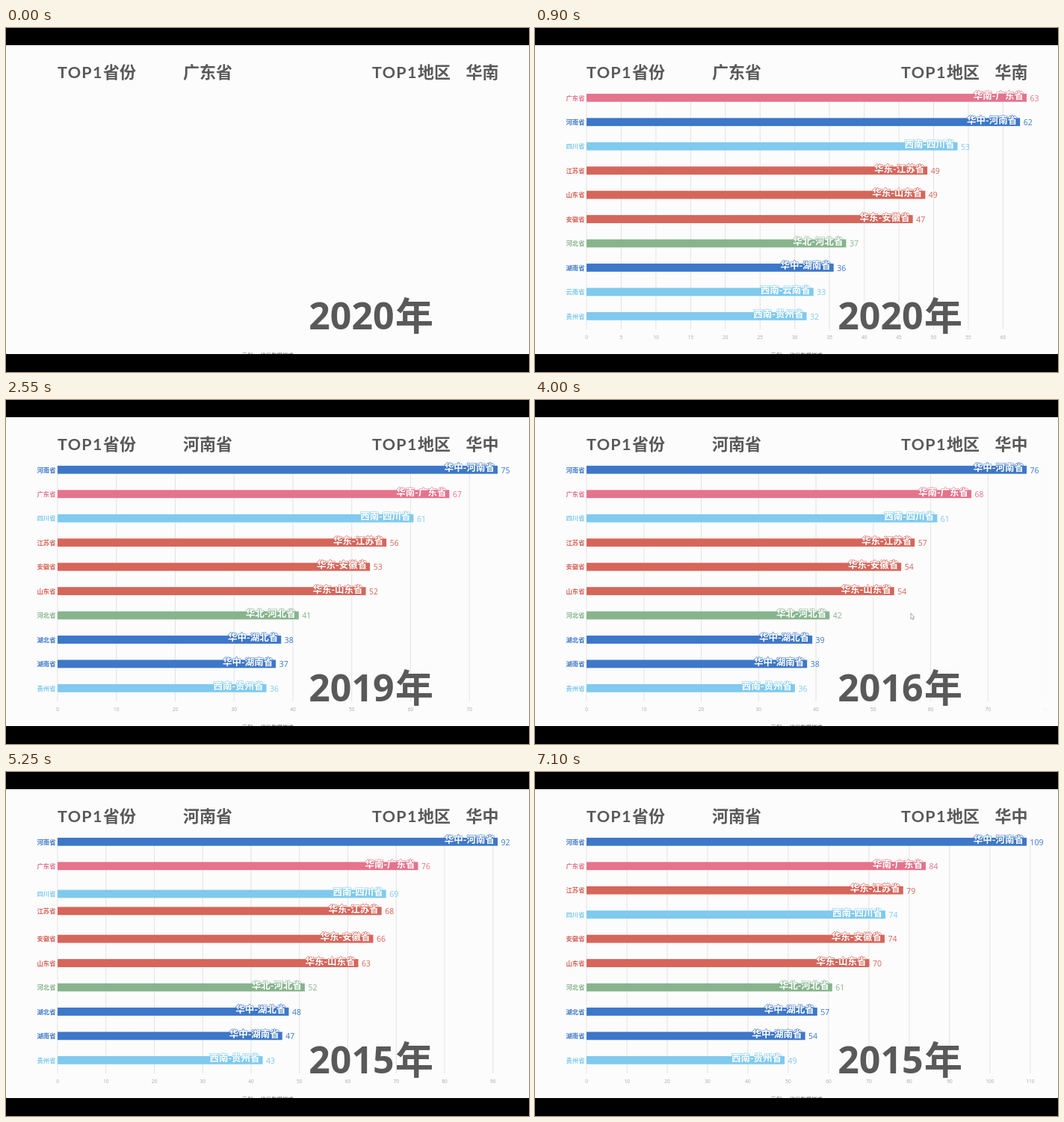
Animation of 700 by 460 pixels, one loop 7150 ms. Source, as an HTML page with a canvas:

```html
<!DOCTYPE html>
<html lang="zh-CN">
<head>
<meta charset="utf-8">
<style>
html, body { margin: 0; overflow: hidden; background: #000; }
canvas { display: block; }
</style>
</head>
<body>
<canvas id="stage" width="700" height="460"></canvas>
<script>
const ctx = document.getElementById('stage').getContext('2d');
const LOOP = 7150, STEP = 1301, LEFT = 69, WIDTH = 589;
const CJK = '"Noto Sans CJK SC", "Noto Sans CJK", sans-serif';
const SANS = '"Open Sans", ' + CJK;
const DARK = '#595959';
const COLORS = { 华南: '#e5738c', 华中: '#3d77c9', 西南: '#7fcaee', 华东: '#d6655a', 华北: '#87b48d' };

// Start of each step between states, and the power of the easing
const MOTION = {
  rank: { starts: [925, 3517, 4818], power: 3 },
  end: { starts: [890, 3517, 4818], power: 2 },
  value: { starts: [870, 3600, 4818], power: 3 },
  scale: { starts: [890, 3560, 4863], power: 3 },
  fade: { starts: [890, 3560, 4863], power: 1 },
};

// Region, province and its value in each state; 0 means not listed
const bars = [
  ['华南', '广东省', 63.4, 66.6, 74.3, 84.1],
  ['华中', '河南省', 62.45, 74.8, 89.2, 109.1],
  ['西南', '四川省', 53.45, 60.5, 68.3, 74.1],
  ['华东', '江苏省', 49.1, 55.9, 66.1, 78.5],
  ['华东', '山东省', 48.8, 52.4, 62, 70.1],
  ['华东', '安徽省', 47, 53.1, 65, 73.9],
  ['华北', '河北省', 37.4, 41, 50.2, 60.9],
  ['华中', '湖南省', 35.6, 37.1, 45.9, 54.2],
  ['西南', '云南省', 32.7, 0, 0, 0],
  ['西南', '贵州省', 31.7, 35.5, 42, 49.1],
  ['华中', '湖北省', 0, 38, 46.9, 57.2],
].map(([region, name, ...values]) => ({ region, name, values }));

const column = i => bars.map(bar => bar.values[i]).filter(Boolean).sort((a, b) => b - a);
const columns = [0, 1, 2, 3].map(column);
const maxima = columns.map(list => list[0]);
const minima = columns.map(list => list.at(-1));
const scales = maxima.map(max => WIDTH / max);

for (const bar of bars) {
  const ranks = bar.values.map((v, i) => columns[i].indexOf(v));
  const known = ranks.find(rank => rank >= 0);
  // Unlisted bars wait just below their place, as long as the shortest bar
  bar.ranks = ranks.map((rank, i) => rank < 0 ? (bar.values[0] ? known : ranks[1] + .6) : rank);
  bar.ends = bar.values.map((v, i) => LEFT + (v || minima[i]) * scales[i]);
  bar.shown = bar.values.map(v => v ? 1 : 0);
}

const phase = (t, start, length = STEP) => Math.min(1, Math.max(0, (t - start) / length));
const ease = (u, n) => u < .5 ? (2 * u) ** n / 2 : 1 - (2 - 2 * u) ** n / 2;

// Adds up the eased steps between states
function tween(states, t, { starts, power }) {
  return starts.reduce((v, s, i) => v + (states[i + 1] - states[i]) * ease(phase(t, s), power), states[0]);
}

function text(str, x, y, font, color, align = 'left') {
  ctx.font = font;
  ctx.fillStyle = color;
  ctx.textAlign = align;
  ctx.fillText(str, x, y);
}

function drawAxis(t, intro) {
  const scale = tween(scales, t, MOTION.scale);
  for (let v = 0; v <= 110; v += 5) {
    const shown = maxima.map(max => v <= max + 1 && v % (max < 70 ? 5 : 10) === 0 ? 1 : 0);
    const x = LEFT + v * scale;
    ctx.globalAlpha = Math.max(0, tween(shown, t, MOTION.fade)) ** 2 * intro;
    ctx.fillStyle = '#e3e3e3';
    ctx.fillRect(x - .5, 88, 1, 315);
    text(v, x, 415.5, '6.5px ' + SANS, '#a6a6a6', 'center');
  }
}

function drawBar(bar, t, intro) {
  const color = COLORS[bar.region];
  const y = 93.3 + 32.45 * tween(bar.ranks, t, MOTION.rank);
  const start = LEFT + minima[0] * scales[0];
  const end = start + (tween(bar.ends, t, MOTION.end) - start) * intro;
  const value = tween(bar.values, t, MOTION.value) * intro;
  const shown = Math.max(0, tween(bar.shown, t, MOTION.rank));
  const leaving = !bar.shown[3];
  ctx.globalAlpha = intro * (leaving ? shown ** 4 : shown);
  if (ctx.globalAlpha < .01) return;
  ctx.fillStyle = color;
  ctx.fillRect(LEFT, y - 5.4, end - LEFT, 10.8);
  text(bar.name, 66.5, y + 3.2, 'bold 8.4px ' + CJK, color, 'right');
  text(Math.round(value), end + 4.5, y + 4.3, '10.5px ' + SANS, color);

  const info = bar.region + '-' + bar.name;
  ctx.font = 'bold 12.5px ' + CJK;
  ctx.textAlign = 'right';
  ctx.strokeStyle = color;
  ctx.lineWidth = 1.1;
  ctx.lineJoin = 'round';
  ctx.strokeText(info, end - 4, y + 2);
  text(info, end - 4, y + 2, ctx.font, '#fff', 'right');
}

function drawHeading(x, label, value, valueX) {
  const font = 'bold 22px ' + CJK;
  ctx.letterSpacing = '1.3px';
  text('TOP1', x, 67, 'bold 21.5px Lato, sans-serif', DARK);
  ctx.letterSpacing = '0px';
  text(label, x + 61, 67.4, font, DARK);
  text(value, valueX, 67.4, font, DARK);
}

function drawCursor(x, y) {
  const arrow = new Path2D(`M${x} ${y}v8l1.8-1.5 1.2 2.5 1-.6-1-2.4 2-.2z`);
  ctx.fillStyle = '#fff';
  ctx.fill(arrow);
  ctx.strokeStyle = '#888';
  ctx.lineWidth = .7;
  ctx.stroke(arrow);
}

function draw(t) {
  const intro = ease(phase(t, 0, 700), 2);
  const later = t >= 950;
  ctx.globalAlpha = 1;
  ctx.fillStyle = '#fcfcfc';
  ctx.fillRect(0, 0, 700, 460);
  drawAxis(t, intro);
  bars.forEach(bar => drawBar(bar, t, intro));
  ctx.globalAlpha = 1;
  drawHeading(69, '省份', later ? '河南省' : '广东省', 237);
  drawHeading(490, '地区', later ? '华中' : '华南', 615.5);
  const year = t < 950 ? 2020 : t < 3000 ? 2019 : t < 4850 ? 2016 : 2015;
  text(year, 405.3, 403, 'bold 50px ' + SANS, DARK);
  text('年', 521, 404, 'bold 51px ' + CJK, DARK);
  if (t >= 3800 && t < 4200) drawCursor(503, 285);
  text('示例 · 省份数据样式', 350, 440, '7.3px ' + CJK, '#666', 'center');
  ctx.fillStyle = '#000';
  ctx.fillRect(0, 0, 700, 23);
  ctx.fillRect(0, 436, 700, 24);
}

const begin = performance.now();
function frame() {
  draw((performance.now() - begin) % LOOP);
  requestAnimationFrame(frame);
}
frame();
</script>
</body>
</html>
```
